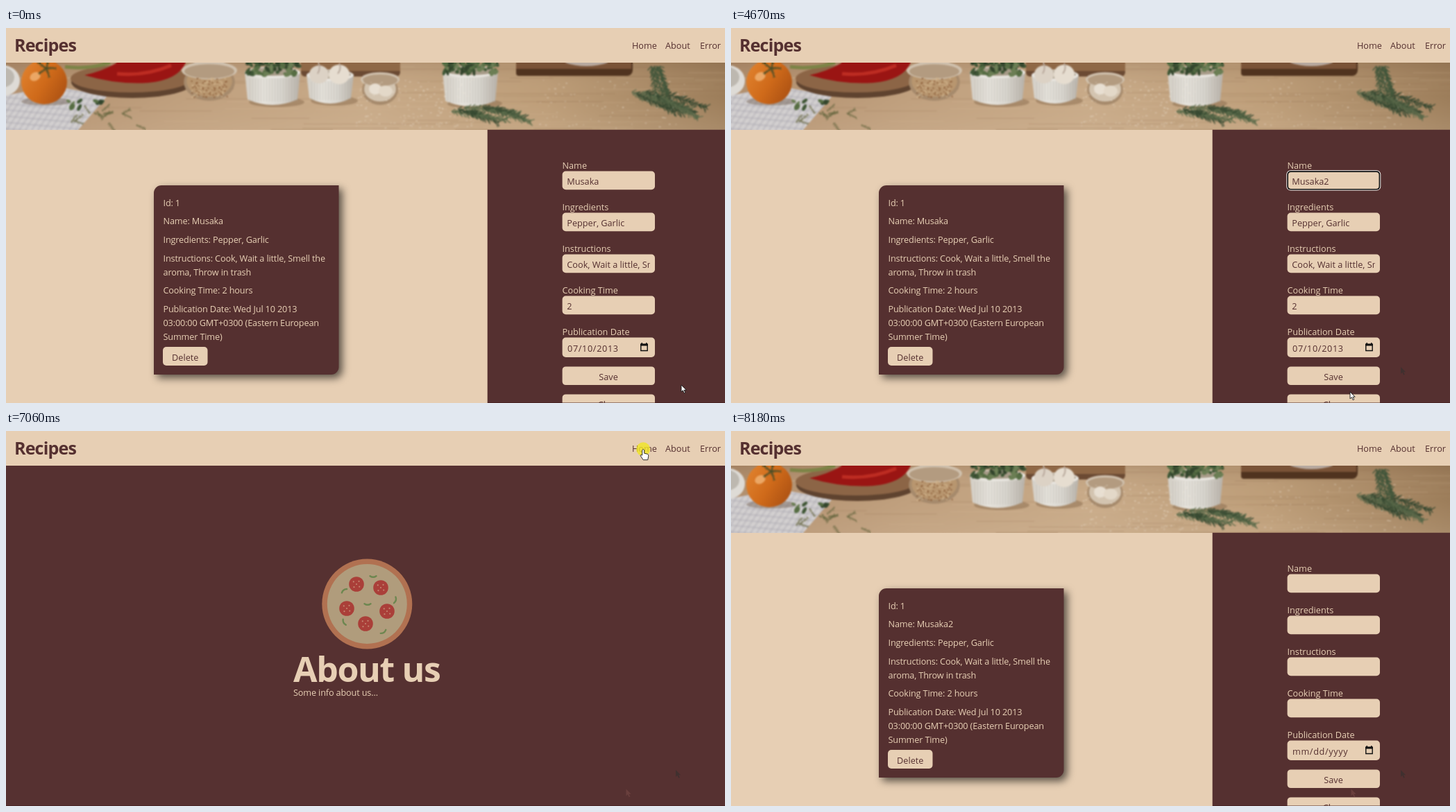
An HTML page with a canvas that plays this animation: 1036 px wide and 541 px high, repeating every 8580 ms.

```html
<!DOCTYPE html>
<html lang="en">
<head>
<meta charset="utf-8">
<title>Recipes</title>
<style>
  html, body { margin: 0; width: 100%; height: 100%; overflow: hidden; background: #e7cfb4; }
  canvas { display: block; }
</style>
</head>
<body>
<canvas id="stage" width="1036" height="541"></canvas>
<script>
const LOOP = 8580, W = 1036, H = 541;
const TAN = '#e7cfb4', BROWN = '#553030';
const FONT = '"Open Sans", "Noto Sans", sans-serif';
let ctx = document.getElementById('stage').getContext('2d');

// ---------- helpers ----------
function rect(x, y, w, h, fill, r = 0) {
  ctx.fillStyle = fill;
  ctx.beginPath();
  ctx.roundRect(x, y, w, h, r);
  ctx.fill();
}
function oval(x, y, rx, ry, fill, turn = 0) {
  ctx.fillStyle = fill;
  ctx.beginPath();
  ctx.ellipse(x, y, rx, ry, turn, 0, Math.PI * 2);
  ctx.fill();
}
function shape(d, fill, stroke, width = 1) {
  const p = new Path2D(d);
  if (fill) { ctx.fillStyle = fill; ctx.fill(p); }
  if (stroke) { ctx.strokeStyle = stroke; ctx.lineWidth = width; ctx.stroke(p); }
}
function text(s, x, y, color, { size = 12.7, weight = 400, track = 0, align = 'left' } = {}) {
  ctx.font = `${weight} ${size}px ${FONT}`;
  ctx.letterSpacing = `${size * track}px`;
  ctx.textAlign = align;
  ctx.fillStyle = color;
  ctx.fillText(s, x, y);
}
function gradient(x0, y0, x1, y1, ...colors) {
  const g = ctx.createLinearGradient(x0, y0, x1, y1);
  colors.forEach((c, i) => g.addColorStop(i / (colors.length - 1), c));
  return g;
}
function bezierEase(x1, y1, x2, y2) {
  const at = (a, b, u) => 3 * a * u * (1 - u) ** 2 + 3 * b * u * u * (1 - u) + u ** 3;
  return x => {
    if (x <= 0) return 0;
    if (x >= 1) return 1;
    let lo = 0, hi = 1;
    for (let i = 0; i < 24; i++) {
      const mid = (lo + hi) / 2;
      if (at(x1, x2, mid) < x) lo = mid; else hi = mid;
    }
    return at(y1, y2, lo);
  };
}
const ease = bezierEase(0.25, 0.1, 0.25, 1);

function random(seed) {
  return () => {
    seed = (seed * 1664525 + 1013904223) >>> 0;
    return seed / 4294967296;
  };
}

// ---------- kitchen banner ----------
const rnd = random(41);
const spread = n => (rnd() - 0.5) * n;

function sprig(x, y, angle, length, needle, color, width = 1.2) {
  ctx.strokeStyle = color;
  ctx.lineWidth = width;
  ctx.beginPath();
  for (let d = 0; d < length; d += 3) {
    const px = x + Math.cos(angle) * d, py = y + Math.sin(angle) * d;
    for (const side of [-1, 1]) {
      const a = angle + side * (0.4 + rnd() * 0.6);
      const n = needle * (0.6 + rnd() * 0.6);
      ctx.moveTo(px, py);
      ctx.lineTo(px + Math.cos(a) * n, py + Math.sin(a) * n);
    }
  }
  ctx.moveTo(x, y);
  ctx.lineTo(x + Math.cos(angle) * length, y + Math.sin(angle) * length);
  ctx.stroke();
}
function herbs(x, y, w, h, count) {
  for (let i = 0; i < count; i++)
    oval(x + spread(w), y + spread(h), 2 + rnd() * 4, 1.5 + rnd() * 2,
      ['#3f5635', '#566d43', '#33452c', '#6b7e54'][i % 4], rnd() * 3);
}
function ramekin(x, top, w, bottom) {
  const l = x - w / 2, r = x + w / 2;
  oval(x + 6, bottom - 4, w / 2, 7, '#8a6c4e80');
  shape(`M${l} ${top}L${l + 4} ${bottom - 8}Q${x} ${bottom + 8} ${r - 4} ${bottom - 8}L${r} ${top}Z`,
    gradient(l, 0, r, 0, '#d2cdc4', '#e6e3dc', '#d9d6cf', '#b8b2a9'));
  for (let i = l + 7; i < r - 4; i += 4) rect(i, top + 9, 1, bottom - top - 14, '#a8a39b60');
  oval(x, top, w / 2, 8, '#e9e6e0');
  oval(x, top - 1, w / 2 - 4, 6, '#a79b88');
}
function glassBowl(x, y, rx, ry, inside) {
  oval(x, y + 6, rx * 0.92, ry, '#a68a6c');
  oval(x, y + 5, rx * 0.82, ry * 0.82, inside);
  oval(x, y - ry * 0.4, rx, ry * 0.48, '#d0c1ae');
  oval(x, y - ry * 0.35, rx * 0.9, ry * 0.38, '#b39b80');
}

function drawKitchen() {
  rect(0, 50, W, 97, gradient(0, 0, W, 0, '#b08e6d', '#c0a07e', '#c8aa88', '#bd9d78', '#9c7d5a'));
  rect(0, 50, W, 97, gradient(0, 50, 0, 147, '#6b4a3030', '#d8bd9c00', '#dcc4a830'));
  for (let i = 0; i < 60; i++)
    rect(rnd() * W, 52 + rnd() * 95, 60 + rnd() * 160, 1, i % 2 ? '#8a674740' : '#dfc5a530');

  // Checked cloth and plate
  const cloth = 'M0 97L70 84 146 98 104 147H0Z';
  shape(cloth, '#d3d0d0');
  ctx.save();
  ctx.clip(new Path2D(cloth));
  for (let i = -80; i < 160; i += 9) {
    shape(`M${i} 147L${i + 42} 84`, null, '#a5a3ac50', 3);
    shape(`M0 ${90 + i}L150 ${104 + i}`, null, '#a5a3ac50', 3);
  }
  ctx.restore();
  oval(-4, 76, 24, 22, '#dedbd6');
  oval(-6, 71, 18, 15, '#bdb8b0');

  // Board, peppers and tomato
  oval(182, 78, 88, 23, '#5f432f');
  oval(180, 73, 87, 20, '#8c6546');
  shape('M113 68Q140 62 160 50H259Q248 75 205 79Q160 82 113 68Z', '#9a1513');
  shape('M160 66Q200 70 238 54', null, '#bd2c22', 5);
  shape('M85 56Q118 60 150 50', null, '#7c8446', 5);
  oval(58, 106, 36, 6, '#6c5a4c70');
  oval(55, 78, 33, 32, gradient(22, 60, 88, 100, '#e0812d', '#cf6a1a', '#a94f12'));
  oval(42, 70, 8, 6, '#eba765', -0.5);
  for (let i = 0; i < 5; i++) sprig(58, 58, i * 1.25, 13, 3, '#4c4f28');

  // Bowls, with boards behind
  rect(425, 50, 143, 20, '#6b4a33', [0, 0, 6, 6]);
  rect(425, 50, 143, 12, '#8f6846');
  rect(735, 50, 168, 19, '#50331f', [0, 0, 8, 4]);
  rect(735, 50, 166, 9, '#7a5337');
  shape('M805 50Q836 60 868 50Z', '#b8aaa0');
  glassBowl(293, 72, 40, 27, '#b8966f');
  for (let i = 0; i < 110; i++) oval(293 + spread(52), 86 + spread(28), 1.1, 1, i % 2 ? '#8a5c38' : '#d3b68e');
  ramekin(384, 64, 80, 111);
  herbs(384, 57, 74, 20, 90);
  ramekin(467, 68, 68, 109);
  oval(451, 67, 14, 13, '#dcd2c5');
  oval(480, 67, 15, 14, '#e6ddd0');
  shape('M449 66Q454 58 450 50M478 66Q484 58 480 51', null, '#b9a99c', 2);
  glassBowl(539, 83, 28, 22, '#d3c4b0');
  oval(532, 88, 9, 8, '#e8dfd2');
  oval(547, 91, 10, 8, '#e3d8c8');
  ramekin(669, 63, 80, 113);
  herbs(669, 56, 78, 17, 80);

  // Loose herbs and flour
  for (let i = 0; i < 14; i++) sprig(90 + rnd() * 100, 108 + rnd() * 32, spread(2), 14, 3, '#66663f', 0.8);
  herbs(115, 110, 50, 12, 10);
  for (let i = 0; i < 9; i++) sprig(642 + i * 9, 114 + rnd() * 12, rnd() * 0.4, 45, 8, i % 2 ? '#34472f' : '#596a49');
  for (let i = 0; i < 8; i++) sprig(902 + i * 7, 92 + i + spread(10), 0.3 + rnd() * 0.3, 62, 8, i % 2 ? '#34462f' : '#596849');
  for (let i = 0; i < 4; i++) sprig(930 + i * 4, 55, 1.1 + rnd() * 0.5, 42, 7, '#41553a');
  for (let i = 0; i < 240; i++) {
    const x = i % 3 ? 590 + spread(170) : 870 + spread(220);
    oval(x, 110 + spread(70), 0.5 + rnd() * 1.2, 0.6, '#f1e7d9a0');
  }
}

function makeBanner() {
  const main = ctx;
  const layer = () => {
    const canvas = document.createElement('canvas');
    canvas.width = W;
    canvas.height = 97;
    ctx = canvas.getContext('2d');
    return canvas;
  };
  const sharp = layer();
  ctx.translate(0, -50);
  drawKitchen();
  const soft = layer();
  ctx.drawImage(sharp, 0, 0);
  ctx.filter = 'blur(1px)';
  ctx.drawImage(sharp, 0, 0);
  ctx = main;
  return soft;
}
const banner = makeBanner();

// ---------- timeline ----------
const SAVED = 5130, ABOUT = 6250, HOME = 7100, GONE = 8180;
const typing = [
  [0, 'Musaka'], [2320, 'Musaka1'], [2520, 'Musaka12'], [2650, 'Musaka123'],
  [2780, 'Musaka12'], [2920, 'Musaka1'], [3190, 'Musaka'], [3730, 'Musaka2'], [SAVED, '']
];
const caretTimes = [[820, 1330], [1860, 3190], [3660, 4270]];
const clicks = [[740, 860], [4990, 5130], [6030, 6180], [6990, 7110]];
const route = [
  [0, 973, 515], [70, 973, 515], [140, 965, 489], [350, 931, 365], [550, 900, 258], [720, 889, 223],
  [4200, 889, 223], [4330, 883, 285], [4480, 884, 430], [4600, 890, 515], [4670, 892, 525],
  [4740, 893, 517], [4940, 918, 499], [5260, 918, 500], [5400, 938, 445], [5600, 978, 250],
  [5760, 984, 110], [5920, 970, 35], [6000, 966, 25], [6500, 966, 25], [6700, 945, 30],
  [6900, 918, 26], [7720, 919, 27], [7850, 925, 100], [7980, 942, 300], [8110, 955, 512], [LOOP, 955, 512]
];
const within = (spans, t) => spans.some(([a, b]) => t >= a && t < b);

function pointerAt(t) {
  const i = route.findIndex(p => p[0] > t);
  const [t0, x0, y0] = route[i - 1], [t1, x1, y1] = route[i];
  const k = (t - t0) / (t1 - t0);
  return [x0 + (x1 - x0) * k, y0 + (y1 - y0) * k];
}

// ---------- page parts ----------
function header() {
  rect(0, 0, W, 50, TAN);
  text('Recipes', 12, 34, BROWN, { size: 25, weight: 700, track: -0.033 });
  text('Home', 902, 29.5, BROWN);
  text('About', 950, 29.5, BROWN);
  text('Error', 1000, 29.5, BROWN);
}

function card(name, scale) {
  ctx.save();
  ctx.translate(346, 363.5);
  ctx.scale(scale, scale);
  ctx.translate(-346, -363.5);
  ctx.shadowColor = 'rgba(0,0,0,.62)';
  ctx.shadowBlur = 12 * scale;
  ctx.shadowOffsetX = ctx.shadowOffsetY = 5 * scale;
  rect(213, 227, 266.5, 273, BROWN, [11, 0, 11, 0]);
  ctx.shadowColor = 'transparent';
  const lines = [
    ['Id: 1', 256.5], [`Name: ${name}`, 283.2], ['Ingredients: Pepper, Garlic', 309.8],
    ['Instructions: Cook, Wait a little, Smell the', 336.5], ['aroma, Throw in trash', 356.5],
    ['Cooking Time: 2 hours', 383.2], ['Publication Date: Wed Jul 10 2013', 409.8],
    ['03:00:00 GMT+0300 (Eastern European', 429.8], ['Summer Time)', 449.8]
  ];
  for (const [s, y] of lines) text(s, 226.5, y, TAN, { track: -0.012 });
  rect(226, 460, 64.5, 27, TAN, 5);
  text('Delete', 258.2, 479.8, BROWN, { align: 'center' });
  ctx.restore();
}

function form(t) {
  const saved = t >= SAVED;
  const name = typing.findLast(([at]) => t >= at)[1];
  const values = saved ? ['', '', '', ''] : [name, 'Pepper, Garlic', 'Cook, Wait a little, Smell the aroma', '2'];
  const labels = ['Name', 'Ingredients', 'Instructions', 'Cooking Time', 'Publication Date'];
  labels.forEach((label, i) => {
    const y = 206.6 + i * 60;
    text(label, 801.5, y - 4, TAN);
    rect(801.6, y, 133.4, i === 4 ? 28.4 : 26.7, TAN, 5);
    if (i === 4) return;
    if (i === 0 && t >= 780 && t < 5020) {
      rect(800.3, 205.3, 136, 29.3, '#f4f1ee', 6);
      rect(801.3, 206.3, 134, 27.3, '#101010', 5);
      rect(803, 208, 130.6, 23.9, TAN, 4);
    }
    ctx.save();
    ctx.beginPath();
    ctx.rect(808, y, 120, 27);
    ctx.clip();
    text(values[i], 808.3, y + 19.3, BROWN);
    ctx.restore();
  });
  if (within(caretTimes, t)) {
    text('', 0, 0, BROWN);
    rect(Math.round(808 + ctx.measureText(name).width), 211, 1, 18, BROWN);
  }
  text(saved ? 'mm/dd/yyyy' : '07/10/2013', 809, 466.8, BROWN, { track: 0.05 });
  shape('M914.8 456.5h9.4v9h-9.4z', null, '#111', 1.4);
  rect(914, 455.5, 11, 3, '#111');
  rect(915.5, 454, 1.5, 2, '#111');
  rect(922, 454, 1.5, 2, '#111');
  rect(801.6, 488.4, 133.4, 26.7, TAN, 5);
  text('Save', 868, 508, BROWN, { align: 'center' });
  rect(801.6, 528.4, 133.4, 26.7, TAN, 5);
  text('Clear', 868, 548, BROWN, { align: 'center' });
}

function homePage(t) {
  rect(0, 50, W, H, TAN);
  ctx.drawImage(banner, 0, 50);
  rect(693.7, 146.8, 343, 395, BROWN);
  card(t < SAVED ? 'Musaka' : 'Musaka2', t < HOME ? 1 : 0.5 + 0.5 * ease((t - 7023) / 1000));
  form(t);
  rect(694, 540, 342, 1, 'rgba(60,25,25,.45)');
}

function aboutPage() {
  rect(0, 50, W, H, '#563131');
  oval(520.3, 249.5, 65, 65, '#b17151');
  oval(520.3, 249.5, 57.5, 57.5, '#b09c7c');
  for (const [x, y] of [[505, 221], [540, 226], [491, 256], [549, 260], [518, 278]]) {
    oval(x, y, 10.8, 10.8, '#aa3f39');
    for (let i = 0; i < 5; i++) {
      const r = i ? 5.5 : 0, a = i * Math.PI / 2 + 0.7;
      oval(x + r * Math.cos(a), y + r * Math.sin(a), 1.1, 1.1, '#c48670');
    }
  }
  ctx.lineCap = 'round';
  for (const [x, y, turn] of [[529, 210, 0], [487, 230, 2.5], [561, 244, -1.3], [521, 250, 0], [487, 276, 1.1], [544, 290, -0.6]]) {
    ctx.save();
    ctx.translate(x, y);
    ctx.rotate(turn);
    shape('M-4.5 -.8Q0 2.4 4.5 -.8', null, '#6d8750', 2.4);
    ctx.restore();
  }
  ctx.lineCap = 'butt';
  text('About us', 414, 362, TAN, { size: 50, weight: 700, track: -0.027 });
  text('Some info about us...', 414, 382.3, TAN, { track: -0.012 });
  rect(0, 540, W, 1, 'rgba(60,25,25,.45)');
}

// ---------- pointer ----------
const ARROW = 'M0 0V10L2.3 7.8 4.2 11.8 5.8 11 4 7.3H7.2Z';
const HAND = 'M-1.5 1.5Q0 -1 1.5 1.5V6L6 7Q8 7.5 7.5 10.5L6.5 15.5H0L-4 9.5Q-4.5 7.5 -1.5 8.8Z';
const IBEAM = 'M-2.5 -5H-.7L0 -4.3 .7 -5H2.5M0 -4.3V4.8M-2.5 5.5H-.7L0 4.8 .7 5.5H2.5';

function mark(d, x, y, fill, stroke, width) {
  ctx.save();
  ctx.translate(x, y);
  shape(d, fill, stroke, width);
  ctx.restore();
}

function pointer(t) {
  if (t >= 140) mark(ARROW, 965, 489, '#40302f');
  if (t >= 4740) mark(ARROW, 893.5, 516.5, '#693f3d');
  if (t >= GONE) return;
  const [x, y] = pointerAt(t);
  const about = t >= ABOUT && t < HOME;
  const inForm = !about && x > 801 && x < 935;
  const onField = inForm && y > 206 && y < 475 && (y - 206) % 60 < 27;
  const onButton = inForm && (y > 488 && y < 515 || y > 528);
  const onLink = y > 14 && y < 36 && (x > 900 && x < 938 || x > 948 && x < 988 || x > 999);
  if (within(clicks, t)) oval(x, y, 10, 10, 'rgba(240,228,38,.82)');
  if (onField) mark(IBEAM, x, y, null, '#2a2020', 1);
  else mark(onButton || onLink ? HAND : ARROW, x, y, '#fff', '#1a1a1a', 0.9);
}

function frame() {
  const t = performance.now() % LOOP;
  if (t >= ABOUT && t < HOME) aboutPage();
  else homePage(t);
  header();
  pointer(t);
  requestAnimationFrame(frame);
}
frame();
</script>
</body>
</html>
```
